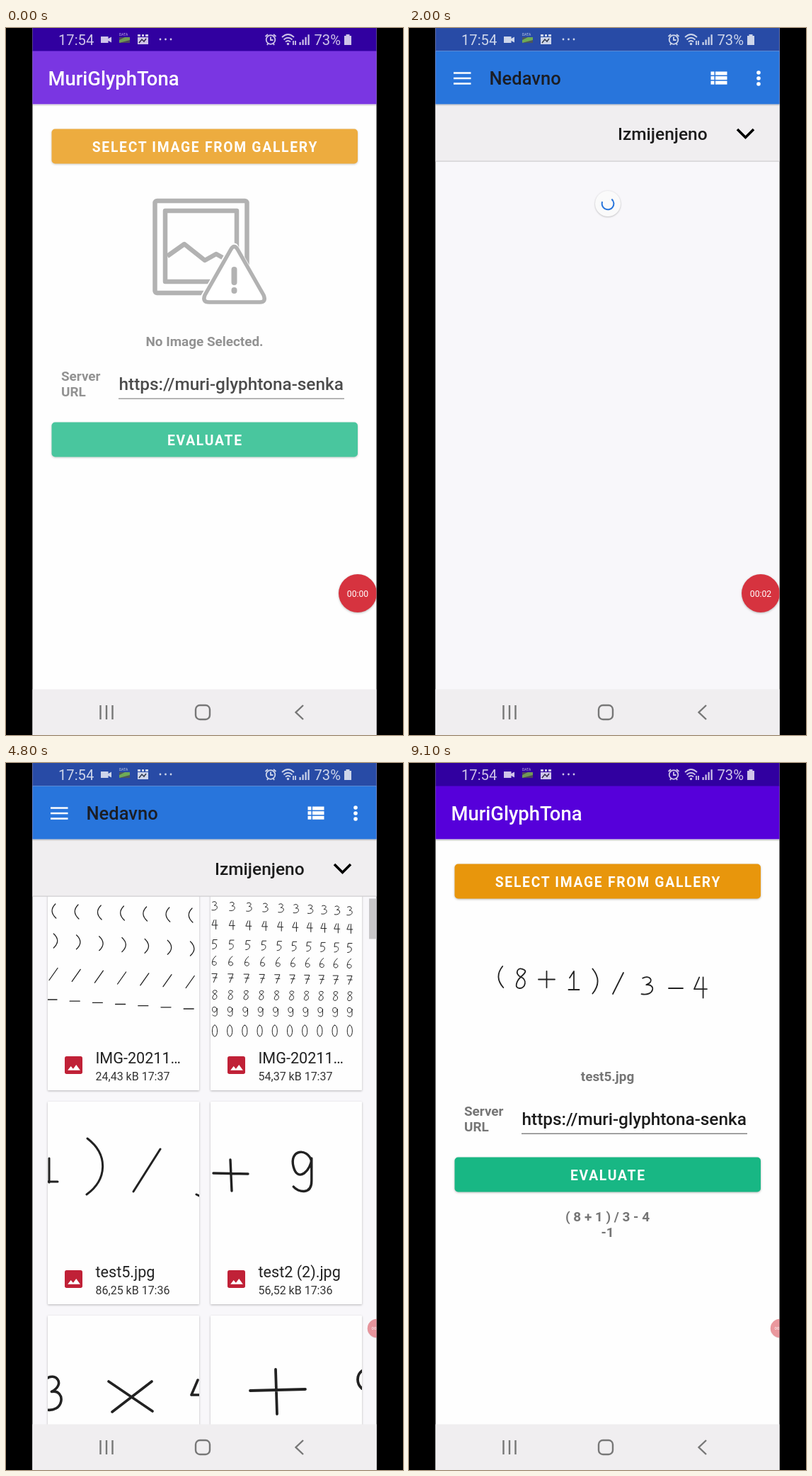
Animation, 561 px wide and 998 px high, one loop 9.2 s. Source, as an HTML page:

```html
<!DOCTYPE html>
<html lang="en">
<head>
<meta charset="utf-8">
<style>
  html, body { margin: 0; width: 100%; height: 100%; overflow: hidden; background: #000; }
  svg { display: block; width: 100vw; height: 100vh; font-family: Roboto, sans-serif; }
  .ink { fill: none; stroke: #222; stroke-linecap: round; stroke-linejoin: round; }
  .ink path { vector-effect: non-scaling-stroke; }
  .bold { font-weight: 700; font-size: 18.9px; fill: #757575; }
  .caps { font-weight: 700; font-size: 19.3px; fill: #fff; letter-spacing: 1.72px; }
  .raised { filter: drop-shadow(0 1.5px 1.5px #0004); }
  .mid { text-anchor: middle; }
  .line { fill: none; stroke-width: 2.4; }
</style>
</head>
<body>
<svg id="stage" viewBox="0 0 561 998"></svg>
<script>
const LOOP = 9200, STEP = 100, PITCH = 302;
const clamp = v => Math.max(0, Math.min(1, v));
const ramp = (t, from, to) => clamp((t - from) / (to - from));
const smooth = v => v * v * (3 - 2 * v);

// Handwritten characters in a 10 x 14 box
const GLYPHS = {
  0: 'M5 0C-1 0-1 14 5 14S11 0 5 0',
  1: 'M1 5L5 0V14M0 14H10',
  2: 'M1 3C2-1 9-1 8 4C7 9 3 11 0 13H10',
  3: 'M1 1C6-2 12 3 4 6C12 5 11 15 0 13',
  4: 'M4 0L0 8H10M7 0V14',
  5: 'M9 0H2L1 6C10 3 11 14 1 14',
  6: 'M7 0C0 4-2 14 4 14S9 6 1 9',
  7: 'M0 1H9L3 14M2 7H9',
  8: 'M8 1C2-2-1 4 5 6S9 14 4 14S1 9 5 6S10 2 8 1',
  9: 'M9 3C7-2-1-1 1 5S9 6 9 2V10C9 15 3 14 1 12',
  '(': 'M7 0Q-4 7 8 14',
  ')': 'M2 0Q14 7 2 14',
  '/': 'M10 0L0 14',
  '-': 'M0 7H10',
  '+': 'M0 7H10M5 0V14'
};
const glyph = (ch, cx, cy, w, h) =>
  `<path transform="translate(${cx - w / 2} ${cy - h / 2}) scale(${w / 10} ${h / 14})" d="${GLYPHS[ch]}"/>`;
const rect = (x, y, w, h, fill, more = '') =>
  `<rect x="${x}" y="${y}" width="${w}" height="${h}" fill="${fill}" ${more}/>`;
const text = (x, y, str, more = '') => `<text x="${x}" y="${y}" ${more}>${str}</text>`;
const path = d => `<path d="${d}"/>`;
const repeat = (n, fn) => Array.from({ length: n }, (_, i) => fn(i)).join('');
const dots = (points, r) => points.map(([x, y]) => `<circle cx="${x}" cy="${y}" r="${r}"/>`).join('');

const pictureIcon = (x, y, size) =>
  `<g transform="translate(${x} ${y}) scale(${size / 24})">${rect(0, 0, 24, 24, '#c02137', 'rx="2.6"')}
   <path d="M4 19L8.3 13.4L11.4 17L15.6 11.4L21 19Z" fill="#fff"/></g>`;

const button = (id, y, color, label) =>
  `<g class="raised">${rect(64.5, y, 432.5, 49, color, 'rx="5"')}</g>
   ${rect(64.5, y, 432.5, 49, '#fff', `rx="5" id="${id}"`)}
   ${text(281.4, y + 32, label, 'class="caps mid"')}`;

const equation = [
  ['(', 130, 302, 11, 30], [8, 158, 304, 16, 28], ['+', 194.5, 305.5, 23, 23], [1, 233, 307, 15, 26],
  [')', 263, 308, 12, 35], ['/', 295.5, 311, 15, 30], [3, 337, 315, 17, 26], ['-', 377, 318, 20, 10],
  [4, 412, 317, 18, 29]
].map(g => glyph(...g)).join('');

const placeholder = `<g fill="none" stroke="#9d9d9d" stroke-width="6.5" stroke-linejoin="round">
  <rect x="210.5" y="244" width="130" height="130" rx="3"/>
  <rect x="225" y="258" width="101" height="100"/>
  <path d="M228 322L252 305L281 328L297 319L306 324"/>
  <path d="M322 310L364 382Q366 387 361 387H284Q278 387 281 381Z" fill="#fff" stroke="#fff" stroke-width="13"/>
  <path d="M317.5 313Q322.5 304 327.5 313L364 377Q368 387 359 387H287Q277 387 281 377Z" fill="#fff" stroke-width="5.5"/>
  <path d="M322.5 341V359M322.5 370V371" stroke-width="8" stroke-linecap="round"/></g>`;

const app = `
  ${rect(37, 0, 488, 1100, '#fefefe')}${rect(37, 933.5, 488, 200, '#f0eef0')}
  ${rect(37, 107, 488, 3, '#0002')}
  ${rect(37, 32, 488, 75.5, '#5600da')}${rect(37, -40, 488, 72.5, '#3100a0')}
  ${text(59.5, 80.5, 'MuriGlyphTona', 'font-size="27.4" font-weight="500" fill="#fff"')}
  ${button('pressSelect', 142.5, '#e8960c', 'SELECT IMAGE FROM GALLERY')}
  <g id="empty">${placeholder}${text(280.5, 449, 'No Image Selected.', 'class="bold mid"')}</g>
  <g id="chosen"><g class="ink" stroke-width="1.8">${equation}</g>
    ${text(280.5, 449, 'test5.jpg', 'class="bold mid"')}</g>
  ${text(78, 498, 'Server', 'class="bold"')}${text(78, 520, 'URL', 'class="bold"')}
  ${text(159.5, 511, 'https://muri-glyphtona-senka', 'font-size="24.4" font-weight="500" fill="#1c1c1c"')}
  ${rect(159, 522.5, 319, 1.5, '#858585')}
  ${button('pressEvaluate', 556.5, '#18b784', 'EVALUATE')}
  ${text(280.5, 647, 'Sending the Files. Please Wait ...', 'id="sending" class="bold mid"')}
  <g id="result">${text(280.5, 647, '( 8 + 1 ) / 3 - 4', 'class="bold mid"')}
    ${text(280.5, 669, '-1', 'class="bold mid"')}</g>
  ${rect(37, 32.5, 488, 901, '#fff', 'id="veil"')}
  ${rect(37, -40, 488, 1140, '#000', 'id="scrim"')}`;

const symbols = [['(', 9, 33, 6, 9, 20], [')', 11, 75, 11, 9, 20], ['/', 8, 122, 11, 12, 17], ['-', 6, 158, 13, 14, 8]]
  .map(([ch, x, y, slope, w, h]) => repeat(7, i => glyph(ch, x + 32.2 * i, y + slope * i / 6, w, h))).join('');
// Columns tighten to the right, less so in the lower rows
const digits = [-9, 26, 52, 80, 103, 127, 151, 175, 202]
  .map((y, row) => repeat(10, i => {
    const squeeze = (8 - row) * 0.065;
    return glyph((row + 2) % 10, 6 + 21.2 * i + squeeze * i * (9 - i), y + (8 - row) * i / 9, 8, row == 8 ? 16 : 13);
  })).join('');

// Name, details, drawing, stroke width
const files = [
  ['IMG-20211…', '24,43 kB 17:37', symbols, 1.3],
  ['IMG-20211…', '54,37 kB 17:37', digits, 1],
  ['test5.jpg', '86,25 kB 17:36', path('M2 80V114M0 113H14M56 52C86 75 84 110 55 131M159 67L121 127M210 131L214 133'), 3],
  ['test2 (2).jpg', '56,52 kB 17:36', path('M4 101L53 102M28 82L30 126') + glyph(9, 130, 100, 32, 56), 3.4],
  ['', '', glyph(3, 8, 111, 26, 50) + path('M86 93L148 135M147 93L91 136M212 91L203 112H214'), 3.6],
  ['', '', path('M56 106L134 104M92 76L94 139M214 78C206 84 206 96 214 103'), 3.8]
];
const card = ([name, info, drawing, weight], i) => `
  <g transform="translate(${59 + 230 * (i % 2)} ${210 + PITCH * (i >> 1)})">
    <g class="raised">${rect(0, 0, 214, 286, '#fefefe', 'rx="1"')}</g>
    <g class="ink thumb" stroke-width="${weight}" clip-path="url(#thumbArea)">${drawing}</g>
    <g class="badge">${pictureIcon(86.5, 87, 41)}</g>
    ${pictureIcon(24, 238, 25)}
    ${text(67.5, 247.5, name, 'font-size="21.6" fill="#222"')}
    ${text(67.5, 271.5, info, 'font-size="16" fill="#333"')}
  </g>`;

const picker = `
  ${rect(37, 0, 488, 1140, '#f8f7fa')}${rect(37, 0, 488, 32.5, '#284ba6')}
  <g id="grid" clip-path="url(#gridArea)"><g id="cards">${files.map(card).join('')}</g>
    <rect id="bar" x="513" width="11" height="57" fill="#c8c7c9"/></g>
  <g id="tools">
    ${rect(37, 107, 488, 81, '#f0eef0')}${rect(37, 187.5, 488, 1.2, '#cfcdd0')}
    ${rect(37, 107, 488, 2.5, '#0002')}${rect(37, 32.5, 488, 75, '#2875dc')}
    <path d="M63 63.5H87.5M63 71H87.5M63 78.5H87.5" stroke="#fff" class="line"/>
    ${text(113.5, 80, 'Nedavno', 'font-size="25.5" font-weight="500" fill="#1b1d24"')}
    <g fill="#fff">${repeat(3, i => rect(426.5, 61.5 + 6.6 * i, 5, 5, '#fff') + rect(433, 61.5 + 6.6 * i, 16.5, 5, '#fff'))}
      ${dots([[494, 63], [494, 71], [494, 79]], 2.8)}</g>
    ${text(295, 158, 'Izmijenjeno', 'font-size="24.5" font-weight="500" fill="#1c1c1c"')}
    <path d="M464 143L475.5 154.5L487 143" fill="none" stroke="#000" stroke-width="3.6"/>
  </g>
  <g id="spinner"><circle r="27" fill="#fafafa" class="raised"/>
    <path id="arc" d="M0-12.5A12.5 12.5 0 1 1-11.7 4.3" fill="none" stroke="#2875dc" stroke-width="3"/></g>
  ${rect(37, 933.5, 488, 200, '#f0eef0')}`;

const statusIcons = `<g fill="#fff" opacity=".77">
  ${text(74, 23.5, '17:54', 'font-size="20.2"')}
  <path d="M134 12H144.5V15L149 12.5V20.5L144.5 18V21H134Z"/>
  ${text(160, 10.5, 'DATA', 'font-size="5"')}
  ${rect(160, 13, 15, 8, '#575a48')}<path d="M160 21V17L168 13H175V17Z" fill="#85c840"/>
  <path d="M186 9H190V12H186ZM192 9H195V12H192ZM197 9H201V12H197ZM186 13H201V23H186Z"/>
  <path d="M188 21L192 16L195 19L198 15" fill="none" stroke="#333" stroke-width="1.5"/>
  ${dots([[218, 16], [225.5, 16], [233, 16]], 1.4)}
  <g fill="none" stroke="#fff" stroke-width="1.8">
    <circle cx="374" cy="16.5" r="6.3"/><path d="M374 12.5V17H377.5M366.5 12L370 9M381.5 12L378 9M369 24L370.5 21.5M379 24L377.5 21.5"/>
    <path d="M390 13Q398.5 5 407 13M392.5 16.5Q398.5 11 404.5 16.5M395 19.5Q398.5 16.5 402 19.5M406 18V24M409 18V24"/></g>
  ${dots([[398.5, 22.5]], 1.7)}
  ${repeat(4, i => rect(414.5 + 4 * i, 20 - 3.6 * i, 2.2, 4 + 3.6 * i, '#fff'))}
  ${text(435.5, 23.5, '73%', 'font-size="20.2"')}
  <path d="M480.5 9H485.5V11H488V24H478V11H480.5Z"/></g>`;

const navIcons = `<g class="line" stroke="#777">
  <path d="M133.5 956V976M142 956V976M150.5 956V976M420 956L409.5 966L420 976"/>
  <rect x="268" y="956" width="20" height="20" rx="6"/></g>`;

document.getElementById('stage').innerHTML = `
  <defs>
    <clipPath id="phone">${rect(37.5, 0, 486, 998, '#000')}</clipPath>
    <clipPath id="gridArea">${rect(37, 188, 488, 746, '#000')}</clipPath>
    <clipPath id="thumbArea">${rect(0, 0, 214, 214, '#000')}</clipPath>
  </defs>
  ${rect(0, 0, 561, 998, '#000')}
  <g clip-path="url(#phone)">
    <g id="app">${app}</g><g id="picker">${picker}</g>${statusIcons}${navIcons}
    <g id="bubble"><circle r="27" fill="#d6333f" class="raised"/>
      ${text(0, 4.5, '', 'id="clock" class="mid" font-size="12.2" fill="#fff"')}</g>
  </g>`;

const $ = id => document.getElementById(id);
const fade = (id, v) => $(id).setAttribute('opacity', v);
const show = (id, on) => $(id).setAttribute('display', on ? 'inline' : 'none');
const move = (id, x, y, more = '') => $(id).setAttribute('transform', `translate(${x} ${y}) ${more}`);
const thumbs = document.querySelectorAll('.thumb'), badges = document.querySelectorAll('.badge');

function draw(t) {
  // Main screen
  const returned = t >= 5400;
  show('empty', !returned);
  show('chosen', returned);
  show('sending', t >= 6900 && t < 7500);
  show('result', t >= 7500);
  fade('veil', 0.21 * (1 - ramp(t, 100, 400)));
  fade('pressSelect', 0.21 * (ramp(t, 900, 1050) - ramp(t, 1600, 1800)));
  fade('pressEvaluate', 0.21 * (ramp(t, 6700, 6850) - ramp(t, 7400, 7700)));
  fade('scrim', returned ? 0 : 0.6 * ramp(t, 1300, 1500));

  // Picker rises while fading in, later slides off the bottom
  const rest = (1 - ramp(t, 1300, 1700)) ** 3, leave = smooth(ramp(t, 5781, 6271));
  show('picker', t > 1300 && t < 6271);
  fade('picker', 1 - rest);
  move('picker', 0, returned ? 998 * leave : 224 * rest);
  move('app', 0, returned ? -28 * (1 - leave) : 0);
  show('tools', t >= 1900);
  show('grid', t >= 2400);

  const scroll = 34 * smooth(ramp(t, 3700, 4700)) + 11 * smooth(ramp(t, 4900, 5300));
  move('cards', 0, -scroll);
  $('bar').setAttribute('y', 189 + scroll * 0.07);
  fade('bar', 0.3 + 0.7 * ramp(t, 3500, 3800));
  thumbs.forEach((thumb, i) => {
    const start = 2650 + 80 * (i >> 1), loaded = ramp(t, start, start + 300);
    thumb.setAttribute('opacity', loaded);
    badges[i].setAttribute('opacity', 1 - loaded);
  });
  show('spinner', t >= 1900 && t < 3150);
  move('spinner', 281, 248, `scale(${ramp(t, 1900, 2050) * (1 - ramp(t, 3000, 3150))})`);
  $('arc').setAttribute('transform', `rotate(${(t - 2800) * 0.4})`);

  // Recorder bubble shrinks into the edge
  const tuck = ramp(t, 2650, 3050);
  move('bubble', 497 + 27 * tuck, 798, `scale(${1 - 0.51 * tuck})`);
  fade('bubble', 1 - 0.5 * ramp(t, 2600, 2950));
  $('clock').textContent = '00:0' + Math.min(3, Math.floor((t + 600) / 900));
}

function tick() {
  draw(Math.floor(performance.now() % LOOP / STEP) * STEP);
  requestAnimationFrame(tick);
}
tick();
</script>
</body>
</html>
```
